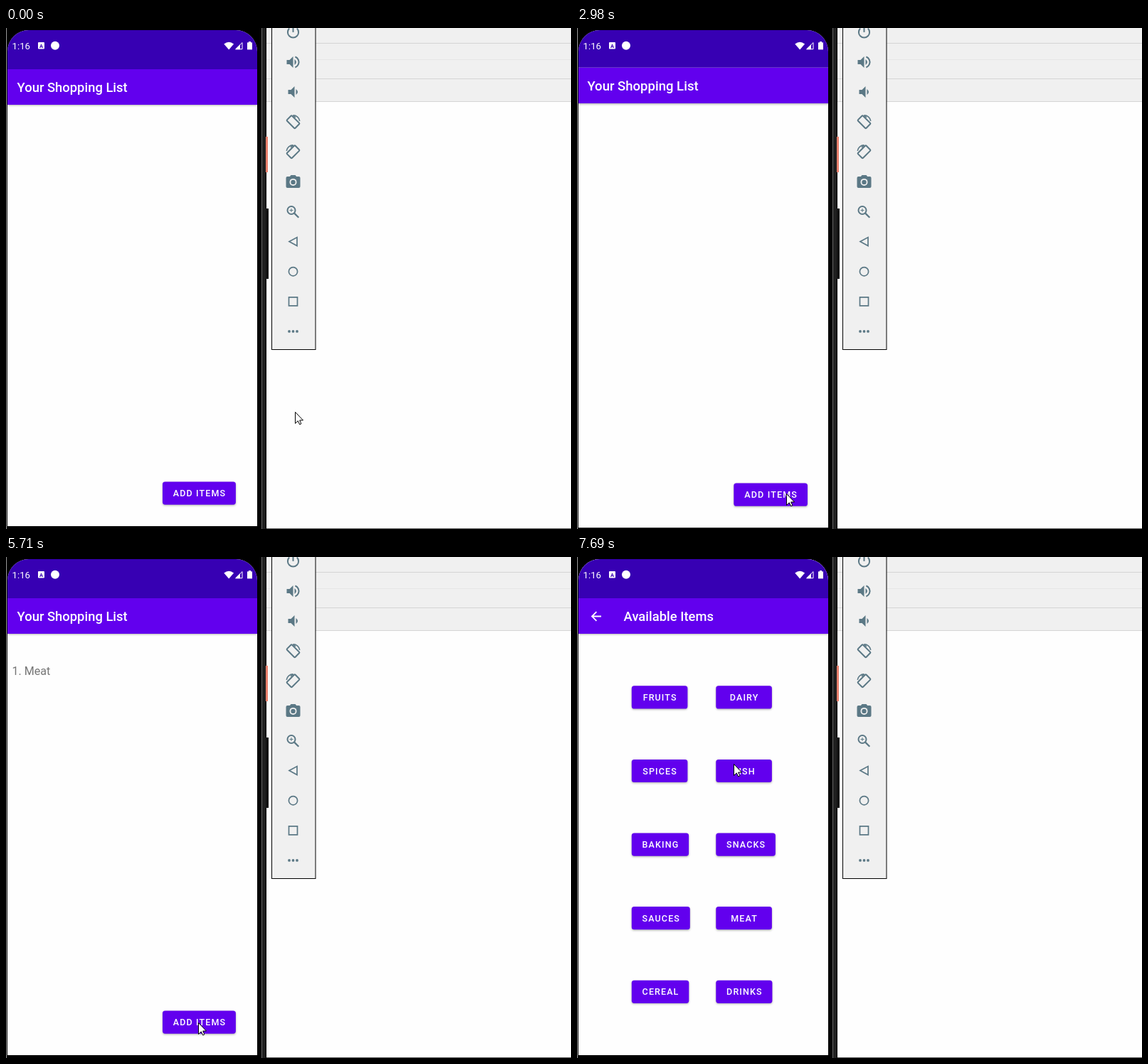
Animation of 794x705 px, one loop 8 s. Source, as an HTML page with a canvas:

```html
<!DOCTYPE html>
<html lang="en">
<head>
<meta charset="utf-8">
<title>Shopping list</title>
<style>
  html, body { margin: 0; width: 100%; height: 100%; overflow: hidden; background: #fefefe; }
  canvas { display: block; }
</style>
</head>
<body>
<canvas id="stage" width="794" height="705"></canvas>
<script>
const c = document.getElementById('stage').getContext('2d');
const LOOP = 8000, STEP = 130;   // the screen refreshes once per STEP while something moves
const PRIMARY = '#6200ee', DARK = '#3700b3', PAPER = '#fefefe', PANEL = '#f0f0f0', ICON = '#5b7885';
const FACE = 'Roboto, "Noto Sans", sans-serif';
const SCREEN = { x: 2, y: 3, w: 351, h: 701 }, MID = { x: 177.5, y: 385 };
const GRID = ['FRUITS DAIRY', 'SPICES FISH', 'BAKING SNACKS', 'SAUCES MEAT', 'CEREAL DRINKS'];

// Each tap lifts its button at `press`; the next page shows at `cut`, already `lag` ms into its transition.
const TAPS = [
  { press: 1560, cut: 2980, lag: 21, page: 'items' },
  { press: 4470, cut: 5350, lag: 162, page: 'list' },
  { press: 6140, cut: 7000, lag: 177, page: 'items' }
];
// Pointer stops, each reached in `n` refreshes.
const STOPS = [
  { t: 580, n: 5, x: 294, y: 655 }, { t: 3400, n: 3, x: 242, y: 482 }, { t: 3890, n: 2, x: 242, y: 505 },
  { t: 5210, n: 4, x: 270, y: 655 }, { t: 7300, n: 4, x: 220, y: 291 }
];

const refreshes = (t, from) => Math.floor((t - from) / STEP);

// Runs `paint` with its own drawing state, moved to x, y.
function group(x, y, paint) {
  c.save();
  c.translate(x, y);
  paint();
  c.restore();
}

function rect(x, y, w, h, color) {
  c.fillStyle = color;
  c.fillRect(x, y, w, h);
}

function rounded(x, y, w, h, r) {
  c.beginPath();
  c.roundRect(x, y, w, h, r);
}

function text(s, x, y, size, color, weight = 400) {
  c.font = `${weight} ${size}px ${FACE}`;
  c.fillStyle = color;
  c.fillText(s, x, y);
}

function fill(d, color) {
  c.fillStyle = color;
  c.fill(new Path2D(d));
}

function line(d, width, color = ICON) {
  c.strokeStyle = color;
  c.lineWidth = width;
  c.stroke(new Path2D(d));
}

function disc(x, y, r, color = ICON) {
  c.fillStyle = color;
  c.beginPath();
  c.arc(x, y, r, 0, 7);
  c.fill();
}

function ring(x, y, r, width, from = 0, to = 2 * Math.PI) {
  c.strokeStyle = ICON;
  c.lineWidth = width;
  c.beginPath();
  c.arc(x, y, r, from, to);
  c.stroke();
}

function shadow(blur, y, alpha) {
  c.shadowColor = `rgba(0,0,0,${alpha})`;
  c.shadowBlur = blur;
  c.shadowOffsetY = y;
}

function button(label, x, y, tap, t) {
  c.font = `500 12.5px ${FACE}`;
  c.letterSpacing = '1.116px';
  const tw = c.measureText(label).width, w = Math.max(78.6, tw + 28.6);
  rounded(x, y, w, 32.2, 3.6);
  group(0, 0, () => {
    if (tap) shadow(9, 4, .36); else shadow(3, 1.2, .3);
    c.fillStyle = PRIMARY;
    c.fill();
  });
  if (tap) {
    const glow = Math.max(0, .24 - .12 * refreshes(t, tap.press));
    c.fillStyle = `rgba(255,255,255,${glow})`;
    c.fill();
  }
  text(label, x + (w - tw) / 2 + .5, y + 20.7, 12.5, '#fff', 500);
  c.letterSpacing = '0px';
}

function backArrow() {
  line('M7 0H-6M.4 -6.4L-6 0L.4 6.4', 1.8, '#fff');
}

function page(name, scale, t) {
  const tap = TAPS.find(p => p.press <= t && t < p.cut);
  const { x, w } = SCREEN;
  group(MID.x, MID.y, () => {
    c.scale(scale, scale);
    c.translate(-MID.x, -MID.y);
    rect(x, 3, w, 698, PAPER);
    rect(x, 701, w, 66, '#000');
    group(0, 0, () => {
      shadow(3, .8, .4);
      rect(x, 58, w, 50, PRIMARY);
    });
    rect(x, 3, w, 55, DARK);
    if (name === 'list') {
      text('Your Shopping List', 15.6, 90.4, 18.4, '#fff', 500);
      if (t >= TAPS[1].cut) text('1. Meat', 8.4, 165.6, 16.1, '#757575');
      button('ADD ITEMS', 220, 638.5, tap, t);
    } else {
      group(27, 83.5, backArrow);
      text('Available Items', 65.6, 90.4, 18.4, '#fff', 500);
      GRID.forEach((row, i) => row.split(' ').forEach((label, j) =>
        button(label, 76.8 + j * 118.5, 181.3 + i * 103.6, label === 'MEAT' && tap, t)));
    }
  });
}

function statusBar() {
  text('1:16', 8.6, 29.7, 13.2, '#fff');
  rounded(45, 20, 9, 9.5, 1);
  c.fill();
  text('A', 46.9, 27.6, 7.5, DARK, 700);
  disc(69, 24.8, 6, '#fff');
  fill('M306.3 22.4Q313.2 17.2 320.1 22.4L313.2 30.6Z', '#fff');
  line('M322.8 29.7H332V20.6Z', 1, '#fff');
  fill('M322 30.2H329V23.2Z', '#fff');
  rect(339, 20.4, 7, 10, '#fff');
  rect(341, 19, 3, 2, '#fff');
}

function screen(t) {
  const tap = TAPS.findLast(p => p.cut <= t);
  if (!tap) return page('list', 1, t);
  const age = tap.lag + refreshes(t, tap.cut) * STEP;
  const p = 1 - (1 - Math.min(1, age / 400)) ** 3;
  if (tap.page === 'list') return page('list', 1.1 - .1 * p, t);
  page('list', 1 + .05 * p, t);
  if (age < 50) return;
  rect(SCREEN.x, SCREEN.y, SCREEN.w, SCREEN.h, 'rgba(0,0,0,.09)');
  page('items', .85 + .15 * p, t);
}

function speaker(x, loud) {
  fill(`M${x - 9} -3h4l5 -5v16l-5 -5h-4z`, ICON);
  fill(`M${x + 2} -4q5 4 0 8z`, ICON);
  if (loud) ring(x, 0, 8, 2, -1.2, 1.2);
}

function rotation(flip) {
  c.scale(flip, 1);
  ring(0, 0, 9.4, 1.6, -Math.PI / 2, -.15);
  line('M0 -9.4L3.4 -6.4', 1.6);
  c.rotate(Math.PI / 4);
  rounded(-8.2, -5, 16.4, 10, 1.2);
  c.lineWidth = 2;
  c.stroke();
}

function camera() {
  rounded(-10, -7.5, 20, 16, 2);
  c.fillStyle = ICON;
  c.fill();
  fill('M-5 -7L-3 -9.5H3L5 -7Z', ICON);
  disc(0, .5, 5, PANEL);
  disc(0, .5, 3.2);
}

function zoom() {
  ring(-2.5, -2, 5.5, 2);
  line('M1.6 2.1L7.8 8.3', 2.2);
  line('M-5 -2h5M-2.5 -4.5v5', 1);
}

function power() {
  ring(0, 0, 7.6, 2, -Math.PI / 4, Math.PI * 1.25);
  line('M0 -9V0', 2);
}

const TOOLS = [
  power, () => speaker(0, true), () => speaker(2), () => rotation(1), () => rotation(-1), camera, zoom,
  () => line('M-5.5 0L5.5 -6V6Z', 1.7),
  () => ring(0, 0, 6.1, 1.7),
  () => line('M-6 -6H6V6H-6Z', 1.7),
  () => [-5.5, 0, 5.5].forEach(x => disc(x, 0, 1.9))
];

function toolbar() {
  rect(373, 0, 62.5, 453, '#000');
  rect(374, 0, 60.5, 452, PANEL);
  TOOLS.forEach((tool, i) => group(403.5, 5.9 + 42.1 * i, tool));
}

function desktop() {
  rect(0, 0, 794, 705, PAPER);
  rect(366, 0, 428, 103, PANEL);
  for (const y of [21, 44, 71, 103]) rect(366, y, 428, 1, y === 44 ? '#e6e6e6' : '#d5d5d5');
  rect(366, 704, 428, 1, '#555');
  rect(1, 0, 365, 705, '#000');
  rect(0, 0, 1, 705, '#999');
  rect(359, 0, 1, 705, '#666');
  rect(360, 0, 5, 705, '#202020');
  rect(365, 153, 3, 50, '#e9806c');
  rect(365, 254, 4, 99, '#111');
}

function pointer(t) {
  let x = 406, y = 540;
  for (const s of STOPS.filter(s => s.t <= t)) {
    const u = Math.min(1, (refreshes(t, s.t) + 1) / s.n), e = Math.sin(u * Math.PI / 2);
    x += (s.x - x) * e;
    y += (s.y - y) * e;
  }
  group(Math.round(x) + .5, Math.round(y) + .5, () => {
    const arrow = 'M0 0V16L3.8 12.4 6.2 17.4 8.4 16.4 6.2 11.5H11Z';
    fill(arrow, '#fff');
    line(arrow, 1, '#000');
  });
}

function draw(t) {
  desktop();
  group(0, 0, () => {
    rounded(SCREEN.x, SCREEN.y, SCREEN.w, SCREEN.h, [30, 30, 0, 0]);
    c.clip();
    screen(t);
    statusBar();
  });
  toolbar();
  pointer(t);
}

const start = performance.now();
function tick() {
  draw((performance.now() - start) % LOOP);
  requestAnimationFrame(tick);
}
tick();
</script>
</body>
</html>
```
